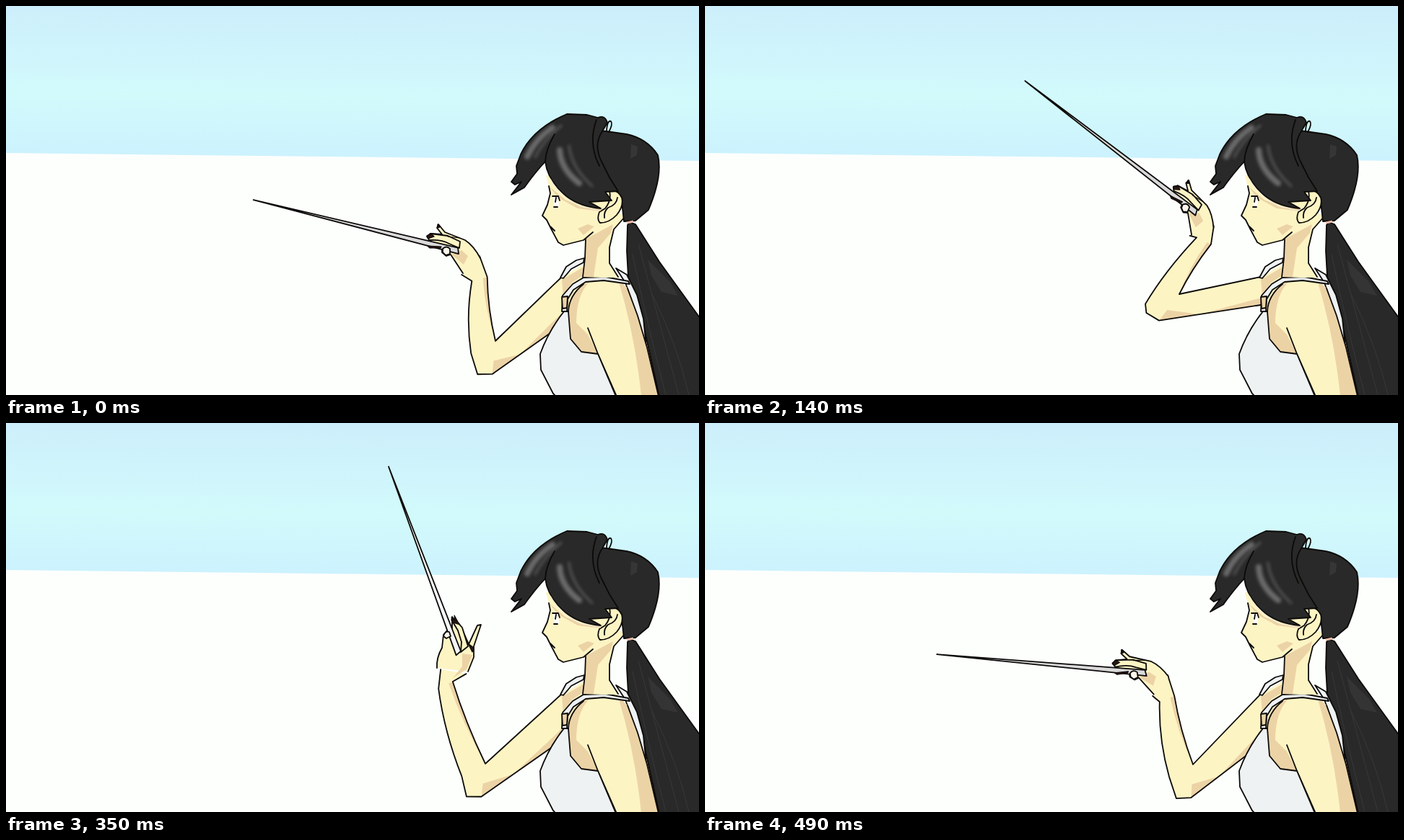
Recreate the animation shown at these times as an HTML page. Size 960 px wide and 540 px high, loop 560 ms.

```html
<!DOCTYPE html>
<html lang="en">
<head>
<meta charset="utf-8">
<title>Conductor</title>
<style>
  html, body { margin: 0; width: 100%; height: 100%; overflow: hidden; background: #fdfffd; }
  svg { display: block; width: 100vw; height: 100vh; }
  .ink { stroke: #0c0a08; stroke-width: 1.8; stroke-linejoin: round; stroke-linecap: round; }
  .line { fill: none; }
  .skin { fill: #fdf4c4; }
  .shade { fill: #ecd3a6; }
  .cloth { fill: #eff2f3; }
  .hair { fill: #292929; }
  .nail { fill: #2a1510; stroke-width: 1.2; }
  .shine { fill: none; stroke: #6a6a6a; stroke-linecap: round; filter: url(#soft); }
</style>
</head>
<body>
<svg viewBox="0 0 960 540" preserveAspectRatio="none">
  <defs>
    <linearGradient id="sky" gradientUnits="userSpaceOnUse" x1="480" y1="0" x2="477" y2="212">
      <stop offset="0" stop-color="#cceefb"/>
      <stop offset=".4" stop-color="#d0f6fc"/>
      <stop offset=".6" stop-color="#d2fafb"/>
      <stop offset="1" stop-color="#ccf2fe"/>
    </linearGradient>
    <filter id="soft" x="-30%" y="-30%" width="160%" height="160%"><feGaussianBlur stdDeviation="2"/></filter>
  </defs>

  <path fill="url(#sky)" d="M0 0H960V215L0 204Z"/>

  <g id="chest">
    <path class="skin" d="M768 378L798 360 832 366 848 378 800 384 778 424 770 420Z"/>
    <path class="shade" d="M770 380L799 363 798 375 784 384 772 404Z"/>
  </g>

  <g id="arm">
    <path id="limb" class="skin"/>
    <path id="limbShade" class="shade"/>
    <path id="limbEdge" class="ink line"/>
    <g id="hand">
      <g id="openPalm" transform="rotate(-14) translate(-627 -340)">
        <path class="skin ink" d="M657 350Q648 333 636 325L608 314 599 303 597 308 604 317 588 316 583 320 588 327 604 333 604 342 610 347 616 345 633 371"/>
        <path class="shade" d="M631 339L640 347 634 359 617 345Z"/>
      </g>
      <g id="raisedPalm" transform="rotate(-69.5) translate(-627 -320)">
        <path class="skin ink" d="M640 345L648 325 648 310 658 280 653 281 641 307 630 282 618 269 618 294 611 288 606 294 604 312Q596 326 597 340"/>
        <path class="shade" d="M632 320L646 322 638 342 619 354 632 338Z"/>
      </g>
      <path id="baton" class="ink"/>
      <g id="openFingers" transform="rotate(-14) translate(-627 -340)">
        <path class="skin ink" d="M586 325Q604 324 614 330L628 336 629 327 612 319 588 316 584 320Z"/>
        <path class="nail ink" d="M583 319L589 316 593 320 585 323ZM598 303L601 307 598 308ZM584 333L603 334 602 336 587 336ZM612 320L628 322"/>
        <path class="ink" fill="#fdf6ea" d="M605 337Q610 332 615 337L615 344 609 346 605 342Z"/>
      </g>
      <g id="raisedFingers" transform="rotate(-69.5) translate(-627 -320)">
        <path class="skin ink" d="M617 273L626 288 631 304 630 318 640 310 632 284 621 272Z"/>
        <path class="nail ink" d="M617 270L622 274 621 267 626 276 629 280 619 277ZM640 306L648 312 646 318Z"/>
        <path class="ink" fill="#fdf6ea" d="M606 296Q608 288 614 290L616 296 610 299Z"/>
      </g>
    </g>
  </g>

  <g id="ponytail">
    <path class="hair ink" d="M864 300L872 303 905 355 962 434V542H905L889 470 875 410 862 376 860 340 861 304Z"/>
    <path fill="#343434" d="M889 352L920 383 931 402 908 397 894 374Z"/>
    <path class="line" stroke="#383838" d="M876 330Q900 420 932 540M868 345Q888 440 914 540M895 400Q930 470 946 540"/>
  </g>

  <g id="torso">
    <path class="cloth ink" d="M845 364L860 373 874 401 883 434 887 474 872 425 858 384Z"/>
    <path class="skin" d="M800 384L825 377 848 379 861 392 875 430 888 474 904 542H846L820 483 797 480 782 462 779 425 784 403Z"/>
    <path class="shade" d="M784 403L800 386 808 383Q790 402 790 440L806 456 820 483 797 480 782 462 779 425Z"/>
    <path class="shade" d="M848 380L861 392 875 430 888 474 904 542H880Q872 460 848 380Z"/>
    <path class="ink line" d="M806 447L820 483 846 542M861 392L875 430 888 474 904 542"/>
    <path class="cloth ink" d="M773 424Q752 450 740 483L741 505 758 538 762 542H845L820 483 797 480 782 462 779 424Z"/>
    <path class="ink line" d="M779 424Q780 402 800 386"/>
    <path class="cloth ink" d="M770 424L771 402 785 386 800 377 830 376 862 382 864 386 828 381 803 383 786 394 778 407 777 424Z"/>
    <path class="shade ink" d="M770 404L778 403 777 419 771 420Z"/>
    <path class="cloth ink" d="M768 377L776 362 790 353 801 350 800 356 783 365 772 378Z"/>
  </g>

  <g id="head">
    <path class="skin" d="M804 312L802 350 799 376 825 377 848 377 837 361 836 335 842 309 857 292 835 280Z"/>
    <path class="shade" d="M804 323L841 303 838 315 820 336 814 376H799L802 350Z"/>
    <path class="ink line" d="M803 324L802 350 799 376M857 293L842 310 836 335 836 357 848 376"/>
    <path class="skin" d="M748 235L754 260 750 276 743 291 749 297 755 309 765 328 772 332 800 325 815 314 836 297 850 262 800 240Z"/>
    <path class="shade" d="M792 309L806 303 815 306 800 318Z"/>
    <path class="shade" d="M752 250L775 269 800 280 828 282 825 285 792 281 765 266Z"/>
    <path class="ink line" d="M752 250L754 260 750 276 743 291 749 297 755 309 765 328 772 332 800 325 813 314M754 306L760 312"/>
    <path fill="#fff" d="M758 264L765 265 766 279 760 279Z"/>
    <path class="ink line" d="M757 264L765 264 767 270M759 279L764 279M762 266L761 272"/>
    <path class="hair ink" d="M815 172L832 174 860 178Q888 184 903 207 910 236 890 283L872 298 856 299 853 272 842 255 812 240Z"/>
    <path class="skin ink" d="M836 257Q847 254 853 266 856 278 846 290 836 301 823 301 818 296 822 286L830 281Q839 270 836 257Z"/>
    <path class="ink line" d="M847 266Q846 276 834 280 828 285 829 294"/>
    <path class="hair ink" d="M777 150L805 151 820 155Q830 151 833 162L826 174Q814 192 824 214L836 238 848 257 830 258 839 270 808 272 824 281Q796 279 776 264 750 242 747 216 733 231 718 252L700 262 714 244 705 248 700 244 708 233 707 222 713 206Q730 170 777 150Z"/>
    <path class="ink line" d="M832 173Q833 158 838 160 841 164 835 175"/>
    <path class="line" stroke="#efe9d5" stroke-width="1.2" d="M754 240Q766 263 795 278L824 284"/>
    <path class="shine" stroke-width="8" d="M722 209Q734 184 757 169M767 200Q768 226 794 246"/>
    <path class="shine" stroke-width="3" opacity=".7" d="M733 210Q744 187 769 166M780 194Q783 224 812 250"/>
    <path fill="#363636" d="M866 192L875 195 874 207 865 212Z"/>
    <path class="ink line" d="M760 178Q748 198 747 216M818 158Q806 190 822 222"/>
    <path fill="none" stroke="#eebba9" stroke-width="3" d="M860 301L869 299"/>
  </g>
</svg>

<script>
const STEP = 70, STEPS = 8;
const SHOULDER = [770, 376];
const el = id => document.getElementById(id);

// Inner elbow, wrist, grip on the baton, baton angle and visible baton length.
const key = (step, elbow, wrist, grip, angle, reach = 293) => ({ step, elbow, wrist, grip, angle, reach });
const keys = [
  key(0, [678, 465], [656, 379], [627, 340], 14),
  key(1, [664, 431], [671, 348], [653, 309], 25.8),
  key(2, [657, 400], [691, 326], [681, 287], 37.6, 300),
  key(3, [651, 423], [657, 327], [667, 272], 68.9),
  key(5, [664, 473], [609, 364], [627, 320], 69.5, 277),
  key(7, [676, 474], [640, 383], [611, 347], 5.1, 291)
];

const mix = (a, b, t) => Array.isArray(a) ? a.map((v, i) => mix(v, b[i], t)) : a + (b - a) * t;

function poseAt(step) {
  const from = keys.findLast(k => k.step <= step);
  const to = keys.find(k => k.step >= step);
  const t = (step - from.step) / (to.step - from.step || 1);
  return Object.fromEntries(Object.keys(from).map(name => [name, mix(from[name], to[name], t)]));
}

// Moves p by a along the direction u and by b across it.
const move = (p, [ux, uy], a, b) => [p[0] + ux * a - uy * b, p[1] + uy * a + ux * b];

function direction(p, q) {
  const dx = q[0] - p[0], dy = q[1] - p[1], length = Math.hypot(dx, dy);
  return [dx / length, dy / length];
}

const bow = (p, q, d) => [(p[0] + q[0]) / 2 - d, (p[1] + q[1]) / 2];

function draw({ elbow, wrist, grip, angle, reach }) {
  const upper = direction(SHOULDER, elbow);
  const fore = direction(elbow, wrist);
  const turn = angle * Math.PI / 180;
  const baton = [Math.cos(turn), Math.sin(turn)];

  const armpit = [SHOULDER[0], SHOULDER[1] + (34 + 20 * upper[1]) / -upper[0]];
  const base = move(elbow, upper, 35, -30);
  const tip = move(elbow, upper, 50, -16);
  const outer = move(elbow, fore, -17 - 36 * fore[0], -37);
  const wristL = move(wrist, fore, 0, -11);
  const wristR = move(wrist, fore, 0, 11);
  const palmR = move(grip, baton, 30, 0);
  const palmL = move(grip, baton, 12, 31);

  const inside = `M${SHOULDER}L${elbow}Q${bow(elbow, wristR, 5)} ${wristR}L${palmR}`;
  const outside = `${palmL}L${wristL}Q${bow(wristL, outer, 8)} ${outer}L${tip} ${base} ${armpit}`;
  el('limb').setAttribute('d', `${inside}L${outside}Z`);
  el('limbEdge').setAttribute('d', `${inside}M${outside}`);

  const edge = mix(wristR, wristL, .28);
  el('limbShade').setAttribute('d',
    `M${armpit}L${base} ${mix(base, elbow, .4)} ${mix(base, armpit, .4)} ${mix(armpit, SHOULDER, .25)}Z` +
    `M${elbow}Q${bow(elbow, wristR, 5)} ${wristR}L${edge}Q${bow(elbow, edge, 6)} ${elbow}Z`);

  // The palm turns to the viewer when the raised forearm falls back.
  const raised = angle > 50 && fore[0] < 0;
  for (const part of ['Palm', 'Fingers']) {
    el('open' + part).style.display = raised ? 'none' : '';
    el('raised' + part).style.display = raised ? '' : 'none';
  }
  el('hand').setAttribute('transform', `translate(${grip}) rotate(${angle})`);
  el('baton').setAttribute('d', `M${-reach} 0L-2 -4 1 4Z`);
  el('baton').setAttribute('fill', angle > 50 ? '#f6f6f8' : '#d9d9d9');
}

const start = performance.now();
let shown = -1;
function tick() {
  const step = Math.floor((performance.now() - start) / STEP) % STEPS;
  if (step !== shown) draw(poseAt(shown = step));
  requestAnimationFrame(tick);
}
tick();
</script>
</body>
</html>
```
